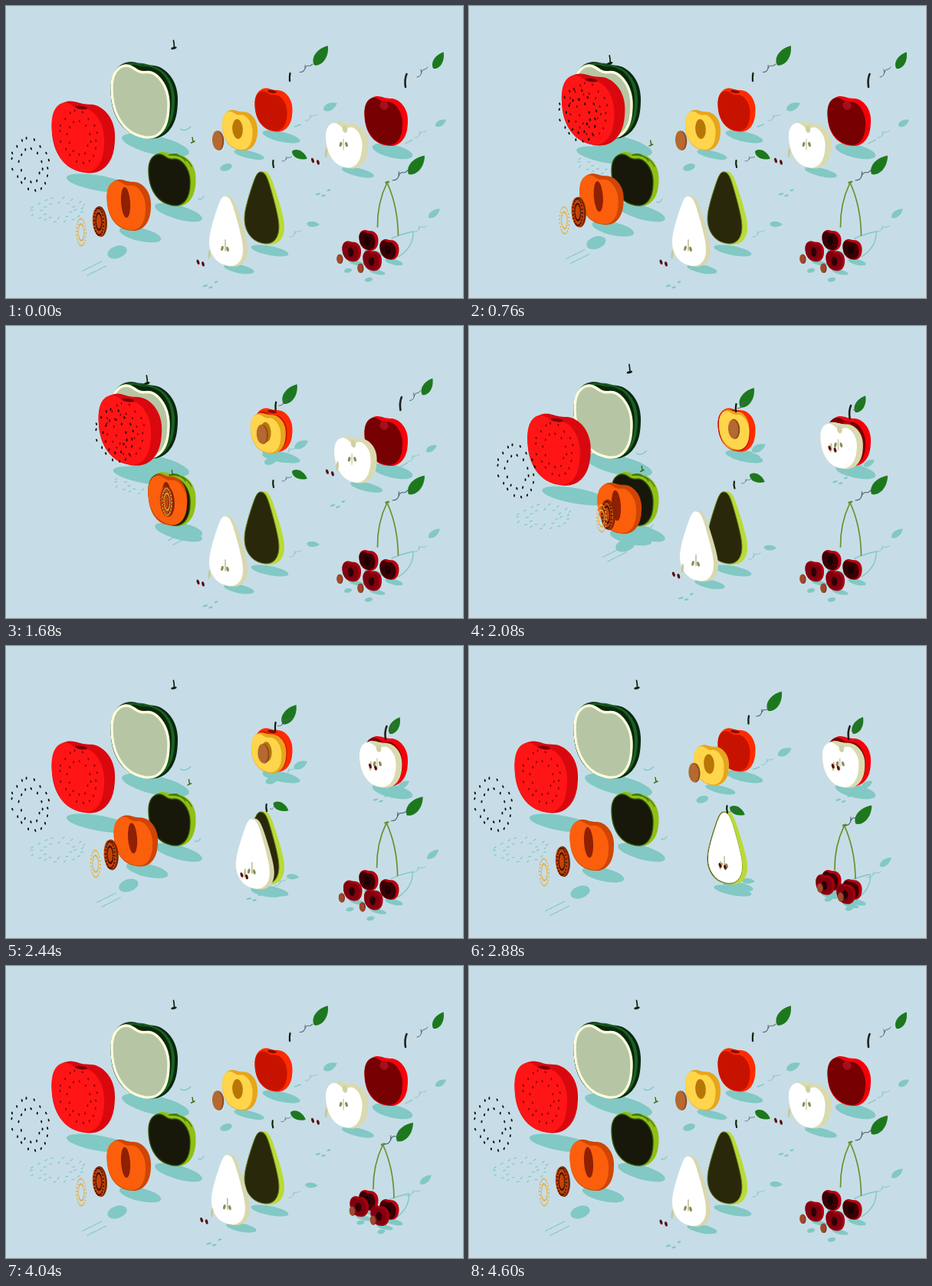
An HTML page with a canvas that plays this animation: 596x382 px, repeating every 4810 ms.

```html
<!DOCTYPE html>
<html lang="en">
<head>
<meta charset="utf-8">
<title>Sliced fruit</title>
<style>
html, body { margin: 0; width: 100%; height: 100%; overflow: hidden; background: #c6dde7; }
canvas { display: block; }
</style>
</head>
<body>
<canvas id="stage" width="596" height="382"></canvas>
<script>
const ctx = document.getElementById('stage').getContext('2d');
const LOOP = 4810, STEP = 40, LAST = 4600;
const SHADE = '#82c8c4', LEAF = '#1d781d', DARK = '#10200f', TWIG = '#4a606b', OLIVE = '#8d8c57';
let closed = 0; // 0 = fully apart, 1 = assembled

const BODY = { dent: .08, shear: .16, foot: .14 };
const CUT = { dent: .15, shear: .26, foot: .14 };
const APPLE_CUT = { dent: .24, shear: .24, foot: .22 };
const PEAR = { dent: 0, shear: .14, neck: .55 };

const power = v => Math.sign(v) * Math.abs(v) ** .86;

// Fruit outline: a rounded square with a dented top, narrowed and sheared, scaled to 0..1
function outline({ dent, shear, foot = 0, neck = 0 }) {
  const points = [];
  for (let i = 0; i < 96; i++) {
    const a = i / 48 * Math.PI;
    let x = power(Math.sin(a)), y = power(-Math.cos(a));
    const down = (y + 1) / 2, smooth = down * down * (3 - 2 * down);
    if (y < 0) y += dent * Math.exp(-((x / .3) ** 2));
    x *= 1 - neck * (1 - smooth) - foot * down;
    points.push([x, y + shear * x]);
  }
  const xs = points.map(p => p[0]), ys = points.map(p => p[1]);
  const left = Math.min(...xs), top = Math.min(...ys);
  const w = Math.max(...xs) - left, h = Math.max(...ys) - top;
  return points.map(([x, y]) => [(x - left) / w, (y - top) / h]);
}

const outlines = new Map([BODY, CUT, APPLE_CUT, PEAR].map(s => [s, outline(s)]));

function fruit(color, shape, x, y, w, h, rim) {
  ctx.beginPath();
  for (const [u, v] of outlines.get(shape)) ctx.lineTo(x + u * w, y + v * h);
  ctx.closePath();
  ctx.fillStyle = color;
  ctx.fill();
  if (rim) {
    [ctx.strokeStyle, ctx.lineWidth] = rim;
    ctx.stroke();
  }
}

// Cut half: a body with its flat face on the left. A sunken half slips into its partner at the end.
function half(side, face, [x, y, w, h], depth, { shape = BODY, cut = CUT, lift = 2, rim, sunk } = {}) {
  const visible = sunk ? depth * Math.min(1, (1 - closed) / .15) : depth;
  fruit(side, shape, x, y, w - depth + visible, h);
  fruit(face, cut, x, y + lift, w - depth, h - lift - 1, rim);
}

function line(color, width, d) {
  ctx.strokeStyle = color;
  ctx.lineWidth = width;
  ctx.stroke(new Path2D(d));
}

function oval(color, x, y, rx, ry, deg = 0) {
  ctx.fillStyle = color;
  ctx.beginPath();
  ctx.ellipse(x, y, rx, ry, deg * Math.PI / 180, 0, 7);
  ctx.fill();
}

const shade = (x, y, rx, ry, deg = 13) => oval(SHADE, x, y, rx, ry, deg);

function shift(dx, dy, draw) {
  ctx.save();
  ctx.translate(dx, dy);
  draw();
  ctx.restore();
}

// Draws a part that travels by (dx, dy) while the fruit closes
const move = (dx, dy, draw) => shift(dx * closed, dy * closed, draw);

function leaf(color, x, y, length, deg, w) {
  shift(x, y, () => {
    ctx.rotate(deg * Math.PI / 180);
    ctx.fillStyle = color;
    ctx.beginPath();
    ctx.moveTo(0, 0);
    for (const s of [1, -1]) {
      const end = s > 0 ? length : 0;
      const near = length * (s > 0 ? .15 : .65), far = length * (s > 0 ? .65 : .15);
      ctx.bezierCurveTo(near, s * w * 1.3, far, s * w * 1.3, end, 0);
    }
    ctx.fill();
  });
}

function twig(color, x, y, length, deg) {
  shift(x, y, () => {
    ctx.rotate(deg * Math.PI / 180);
    ctx.scale(length / 20, length / 20);
    line(color, .9, 'M0,0Q4,3 8,0T14,-1T20,0M8,0L11,-4');
  });
}

function random(seed) {
  return () => {
    seed = (seed * 16807) % 2147483647;
    return seed / 2147483647;
  };
}

function ring(n, x, y, rx, ry, skew, draw) {
  for (let i = 0; i < n; i++) {
    const a = i / n * Math.PI * 2, u = Math.cos(a) * rx;
    draw(x + u, y + Math.sin(a) * ry + u * skew);
  }
}

function scatter(color, x, y, rx, ry, skew, w, h, deg) {
  const next = random(77);
  for (const [n, k] of [[18, 1], [12, .62]]) {
    ring(n, x, y, rx * k, ry * k, skew, (px, py) =>
      oval(color, px + (next() - .5) * rx * .16, py + (next() - .5) * ry * .16, w, h, deg + next() * 40 - 20));
  }
}

const pips = (color, x, y, w, h) =>
  [1, .62].forEach(k => ring(22, x, y, 6.2 * k, 17.5 * k, .2, (px, py) => oval(color, px, py, w, h, -15)));

const pair = (color, x, y, dx, dy, tilt) => {
  oval(color, x, y, 1.7, 3.3, tilt);
  oval(color, x + dx, y + dy, 1.7, 3.3, -15);
};

const seedShade = (x, y) => [0, 1, 2].forEach(i =>
  shade(x + i * 7, y + (i === 2 ? -5 : i * 2), 3.4 - i * .4, 1.3, -15));

const pit = (color, side, x, y, rx, ry) => {
  oval(side, x + rx * .15, y, rx, ry, -4);
  oval(color, x - rx * .05, y, rx * .92, ry * .97, -4);
};

const watermelon = {
  times: [-30, 1200, 1268, 1200],
  shadow() {
    shade(195, 182, 45, 12);
    move(80, -47, () => shade(122, 232, 44, 10, 10));
    move(-46, 26, () => line(SHADE, 1.4, 'M228,161Q233,165 241,158'));
    move(144, -83, () => scatter(SHADE, 68, 267, 34, 15, -.04, 2.4, .65, -24));
  },
  body() {
    ['#09270e', '#19611f', '#09270e'].forEach((c, i) =>
      fruit(c, BODY, 136.5, 73 + i, 87.5 - i * 4, 100.5 - i * 2));
    line('#19611f', 2, 'M160,77Q180,72 200,84');
    fruit('#b6c6a5', CUT, 138, 78, 74, 94, ['#fffddc', 3.4]);
    move(80, -47, () => {
      half('#d9080f', '#ff1515', [59.5, 124.5, 82.5, 94], 14);
      oval('#7c0007', 98, 133, 8, 2.2, 8);
      scatter('#6b0008', 95, 172, 24, 32, .25, .8, 1.6, -5);
    });
    move(144, -84, () => scatter('#160a0b', 32, 208, 24, 32, .25, 1, 1.9, -5));
    move(-46, 26, () => {
      line(DARK, 1.7, 'M218.5,45Q219.5,50 219.5,54');
      oval(DARK, 219, 55, 3.8, 1.5, -15);
    });
  }
};

const cantaloupe = {
  times: [350, 1200, 1586, 1200],
  shadow() {
    shade(225, 270, 32, 9, 16);
    move(54.5, -33.5, () => shade(175, 299, 28, 8.5));
    move(89, -53, () => shade(145, 322, 13, 8, -18));
    move(113, -67, () => [-3, 3].forEach(d => {
      for (let i = 0; i < 8; i++) shade(104 + i * 3.2 + d, 349 - i * 1.6 + d, 2.2, .6, -40);
    }));
    move(-27, 17, () => line(SHADE, 1.3, 'M251,252Q254,255 258,249'));
  },
  body() {
    half('#91bf13', '#17180a', [186, 191, 61.5, 71], 7.5, { lift: 3, rim: ['#30520c', 1.4] });
    for (let i = 0; i < 3; i++) line('#3e7610', 1.2, `M213,195Q${222 + i * 6},${192 + i} ${226 + i * 8},${196 + i * 7}`);
    move(54.5, -33.5, () => {
      half('#cf4505', '#fb5f0b', [131.5, 227, 57.5, 67], 7, { sunk: true });
      oval('#8f2003', 156, 257, 6, 20, -4);
    });
    move(89, -53, () => {
      pit('#c34408', '#7d2602', 121.5, 282, 9, 20);
      pips('#3b0e02', 121, 282, .9, 1.3);
    });
    move(113, -67, () => pips('#e5ae43', 98, 296, .85, 1.2));
    move(-27, 17, () => line('#3d6b14', 1.5, 'M243,172L244,178M241.5,179L246,177'));
  }
};

const peach = {
  times: [855, 1155, 2134, 1155],
  shadow() {
    shade(359, 171, 25, 6.5);
    move(43.5, -26.5, () => shade(317, 194.5, 20, 5));
    move(69, -41, () => shade(287, 211, 8, 4.6, -18));
    move(-45, 28, () => leaf(SHADE, 414, 136, 20, -27, 5));
    move(-33, 21, () => twig(SHADE, 390, 150, 18, -27));
    move(-22, 14, () => line(SHADE, 1.4, 'M376,158L384,155'));
  },
  body() {
    half('#ff2b00', '#c81200', [324.5, 107.5, 49, 57], 7, { lift: 4 });
    oval('#8a0c00', 347, 112, 6, 2, 8);
    move(44, -26.5, () => {
      half('#e7a51b', '#ffd54c', [282, 136, 46, 53], 6.5, { sunk: true });
      oval('#b87606', 302, 161, 6.8, 13, -4);
    });
    move(69, -41, () => pit('#b5682f', '#8d4a20', 276, 176, 7.2, 12.8));
    move(-22, 14, () => line(DARK, 2.3, 'M370.5,88Q369.5,92 370,98'));
    move(-48, 29, () => leaf(LEAF, 402, 77.5, 31, -55, 7.5));
    move(-33, 21, () => twig(TWIG, 383, 86.5, 20, -32));
  }
};

const apple = {
  times: [1378, 850, 2840, 850],
  shadow() {
    shade(504, 190, 27, 8.5);
    move(44, -27, () => shade(459, 217.5, 21.5, 5.5));
    move(75, -45, () => seedShade(407, 246));
    move(-48, 28, () => leaf(SHADE, 560, 157, 16, -30, 4));
    move(-37, 20, () => twig(SHADE, 533, 172, 18, -30));
    move(-26, 16, () => line(SHADE, 1.4, 'M521,180L530,175'));
  },
  body() {
    half('#f60009', '#770003', [467.5, 118, 56.5, 65], 7);
    oval('#a3101c', 493, 130, 5.5, 6, -20);
    move(44, -27, () => {
      half('#dadab0', '#fff', [417, 151, 55.5, 61.5], 8, { cut: APPLE_CUT });
      oval('#d0cfa5', 442, 161, 3.2, 5, -10);
      pair(OLIVE, 436.5, 181, 7.5, 0, 10);
      line('#b5b48a', 1, 'M440,174V188');
    });
    move(58, -35, () => oval('#c9c79b', 417.5, 192, 1.6, 6.5, 4));
    move(75, -45, () => pair('#5a0c09', 400, 202, 7, 2.5, -18));
    move(-26, 16, () => line('#25211c', 2.6, 'M522.5,89Q519.5,96 521,106'));
    move(-57, 33, () => leaf(LEAF, 557.5, 82, 25.5, -59, 6));
    move(-37, 18, () => twig(TWIG, 536, 93, 19, -43));
  }
};

const pear = {
  times: [1705, 1150, 3007, 1250],
  shadow() {
    shade(344, 320, 25, 6, 11);
    move(47, -29.5, () => shade(304, 344, 20, 5.5, 11));
    move(77, -48, () => seedShade(260, 366));
    move(-36, 22, () => leaf(SHADE, 392, 285, 17, 3, 3.6));
    move(-26, 16, () => twig(SHADE, 370, 302, 18, -29));
  },
  body() {
    const shape = { shape: PEAR, cut: PEAR, lift: 1 };
    half('#b9da36', '#2a280b', [311, 216, 52, 96], 7, { ...shape, rim: ['#6f861d', 1] });
    move(47, -30.5, () => {
      half('#d8d7ad', '#fff', [265, 248, 50, 93], 6, { ...shape, sunk: true });
      pair(OLIVE, 282, 317, 7, 1, 12);
      line('#b0af82', 1.3, 'M286,306V320');
    });
    move(63, -38, () => oval('#c9c79b', 265, 325, 1.6, 6, 4));
    move(77, -48, () => pair('#5a0c09', 250.5, 335, 6.5, 2.5, -18));
    move(-12, 7, () => line(DARK, 2.2, 'M348.5,202Q347.5,206 349,211'));
    move(-33, 21, () => leaf(LEAF, 373, 190, 22, 26, 5.5));
    move(-21, 14, () => twig(TWIG, 360, 203, 14, -25));
  }
};

const eachCherry = draw => [0, 1].forEach(i => shift(i * 27, i * 12, draw));

const cherry = {
  times: [2225, 1150, 3440, 1150],
  shadow() {
    eachCherry(() => {
      shade(479, 323, 12, 3.6);
      move(22, -14, () => shade(457, 336, 11, 3));
      move(36, -23, () => shade(446, 346, 5.2, 2.8, -12));
    });
    move(-12, 6, () => line(SHADE, 1.4, 'M503,304Q516,298 531,295Q532,315 512,328'));
    move(-24, 18, () => leaf(SHADE, 551, 277, 19, -38, 4.2));
    move(-18, 12, () => twig(SHADE, 531, 295, 19, -22));
  },
  body() {
    eachCherry(() => {
      half('#b8000f', '#3a0005', [460.5, 293, 25, 27], 4);
      oval('#180002', 471, 307, 3.8, 6, -5);
      move(22, -14, () => {
        half('#a5000e', '#820010', [438.5, 307.5, 24.5, 27], 3.5);
        oval('#2c0003', 449.5, 322, 3.8, 6, -5);
      });
      move(36, -23, () => pit('#a2472c', '#6d2a1b', 435, 331, 3.9, 6.2));
    });
    move(-12, 6, () => {
      line('#6b902d', 1.7, 'M497,231Q484,258 484.5,289M497,231Q511,262 511.5,300');
      line('#6b902d', 2.6, 'M495.5,231L499,230');
    });
    move(-33, 20, () => leaf(LEAF, 525, 220, 32, -49, 7.5));
    move(-23, 11, () => twig(TWIG, 504, 228, 24, -33));
  }
};

const fruits = [watermelon, cantaloupe, peach, apple, pear, cherry];

function ease(p) {
  p = Math.min(1, Math.max(0, p));
  return p < .5 ? 2 * p * p : 1 - 2 * (1 - p) ** 2;
}

const closedAt = (t, [shutAt, shutFor, openAt, openFor]) =>
  ease((t - shutAt) / shutFor) - ease((t - openAt) / openFor);

function render(t) {
  ctx.fillStyle = '#c6dde7';
  ctx.fillRect(0, 0, 596, 382);
  ctx.lineCap = ctx.lineJoin = 'round';
  for (const layer of ['shadow', 'body']) {
    for (const item of fruits) {
      closed = closedAt(t, item.times);
      item[layer]();
    }
  }
}

const start = performance.now();
function tick() {
  const t = (performance.now() - start) % LOOP;
  render(Math.min(LAST, Math.floor(t / STEP) * STEP));
  requestAnimationFrame(tick);
}
tick();
</script>
</body>
</html>
```
